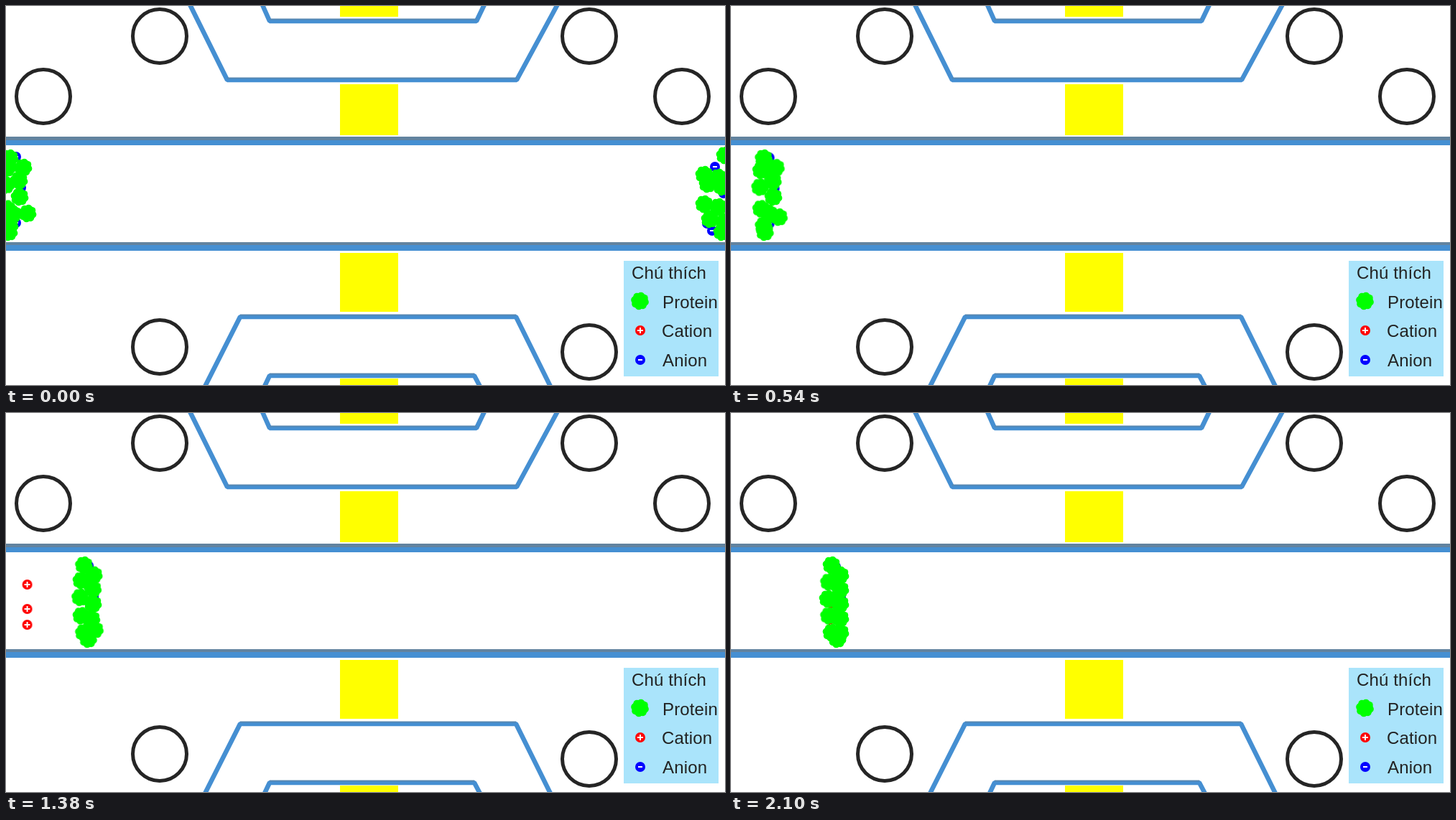
An HTML page that plays this animation: 1001x528 px, repeating every 2730 ms.

```html
<!DOCTYPE html>
<html lang="vi">
<head>
<meta charset="utf-8">
<title>Chú thích</title>
<style>
  html, body { margin: 0; width: 100%; height: 100%; overflow: hidden; background: #fff; }
  svg { display: block; width: 1001px; height: 528px; }
  text { font: 24px "Liberation Sans", Arial, sans-serif; letter-spacing: .15px; fill: #222; }
  .soft { filter: blur(.6px); }
  .wire { fill: none; stroke: #458fd2; stroke-width: 6.5; stroke-linejoin: bevel; }
  .shade { fill: none; stroke: #62839f; stroke-width: 2; }
  .rings { fill: none; stroke: #252525; stroke-width: 5; }
  .gather, .leave, .chase { animation: 2730ms -1ms infinite; }
  .gather { animation-name: gather; animation-timing-function: steps(60, end); }
  .leave { animation-name: leave; animation-timing-function: steps(20, end); }
  .chase { animation-name: chase; animation-timing-function: steps(70, end); }
  @keyframes gather { 65.934%, 100% { transform: translate(var(--dx), var(--dy)); } }
  @keyframes leave { 21.978%, 100% { transform: translate(var(--dx), var(--dy)); } }
  @keyframes chase { 76.923%, 100% { transform: translate(var(--dx), var(--dy)); } }
</style>
</head>
<body>
<svg viewBox="0 0 1001 528">
  <defs>
    <g id="protein" fill="#0f0"><circle r="11.2"/></g>
    <g id="cation"><circle r="7" fill="#f00"/><path d="M-4 0H4M0-4V4" stroke="#fff" stroke-width="2"/></g>
    <g id="anion"><circle r="7" fill="#00f"/><path d="M-3 0H3" stroke="#fff" stroke-width="2"/></g>
    <circle id="ring" r="37.5"/>
  </defs>
  <rect width="1001" height="528" fill="#fff"/>

  <path fill="#ff0" d="M465 0h81v15h-81zM465 109h81v71h-81zM465 344h81v82h-81zM465 519h81v9h-81z"/>

  <g class="soft">
    <g class="wire">
      <path d="M254-6L308 103H711L770-6"/>
      <path d="M275 534L326 433H710L760 534"/>
      <path d="M355-6L367 21H655L668-6"/>
      <path d="M358 534L367 515H652L662 534"/>
    </g>
    <path class="shade" d="M367 18.5H655M308 100.5H711M326 430.5H710M367 512.5H652" opacity=".6"/>
    <path fill="#62839f" d="M-5 182h1011v6h-1011zM-5 329h1011v5h-1011z"/>
    <path fill="#458fd2" d="M-5 187h1011v7h-1011zM-5 333h1011v8h-1011z"/>
  </g>

  <g class="rings">
    <use href="#ring" x="214" y="42"/>
    <use href="#ring" x="52" y="126"/>
    <use href="#ring" x="812" y="42"/>
    <use href="#ring" x="941" y="126"/>
    <use href="#ring" x="214" y="475"/>
    <use href="#ring" x="812" y="482"/>
  </g>

  <g id="particles"></g>

  <rect x="860" y="355" width="132" height="161" fill="#aae4fb"/>
  <use href="#protein" x="882.5" y="411"/>
  <use href="#cation" x="883" y="452"/>
  <use href="#anion" x="883" y="493"/>
  <text x="871" y="380">Chú thích</text>
  <text x="914" y="421">Protein</text>
  <text x="913" y="461">Cation</text>
  <text x="914" y="502">Anion</text>
</svg>
<script>
  const NS = 'http://www.w3.org/2000/svg';
  const add = (parent, tag, attrs) => {
    const el = document.createElementNS(NS, tag);
    for (const key in attrs) el.setAttribute(key, attrs[key]);
    return parent.appendChild(el);
  };

  // Lumpy outline of the protein
  const blob = document.getElementById('protein');
  for (let i = 0; i < 8; i++) {
    const a = i * Math.PI / 4 + 0.2;
    add(blob, 'circle', { cx: 7.6 * Math.cos(a), cy: 7.6 * Math.sin(a), r: 4.9 });
  }

  const layer = document.getElementById('particles');
  const place = (kind, move, x, y, dx, dy = 0) =>
    add(layer, 'use', { href: '#' + kind, x, y, class: move, style: `--dx:${dx}px;--dy:${dy}px` });

  // Ions lie behind the proteins
  for (const y of [239, 273, 295]) place('cation', 'chase', -187, y, 329.5);
  for (const [x, y] of [[14, 210], [21, 253], [14, 302]]) place('anion', 'gather', x, y, 132, 4);
  for (const [x, y] of [[987, 224], [999, 261], [976, 303], [983, 313]]) place('anion', 'leave', x, y, 37);

  // Left group: two loose columns that close up into even rows
  for (let i = 0; i < 5; i++) {
    const lift = 11 * Math.max(0, Math.sin(i * Math.PI / 3));
    place('protein', 'gather', 5 - 5 * Math.sin(i * Math.PI / 4), 212 + 23.5 * i - lift, 135, lift);
  }
  const column = [[24, 225], [18, 243], [19, 266], [10, 290], [30, 289]];
  column.forEach(([x, y], i) => place('protein', 'gather', x, y, 152 - x, 226 + 20 * i - y));
  place('protein', 'gather', 4, 315, 144);

  // Right group: a ragged edge with a second layer behind it
  for (const [x, y] of [[1001, 208], [972, 235], [977, 248], [972, 276], [980, 297], [997, 315]]) {
    place('protein', 'leave', x + 20, y + 4, 54);
    place('protein', 'leave', x, y, 54);
  }
</script>
</body>
</html>
```
